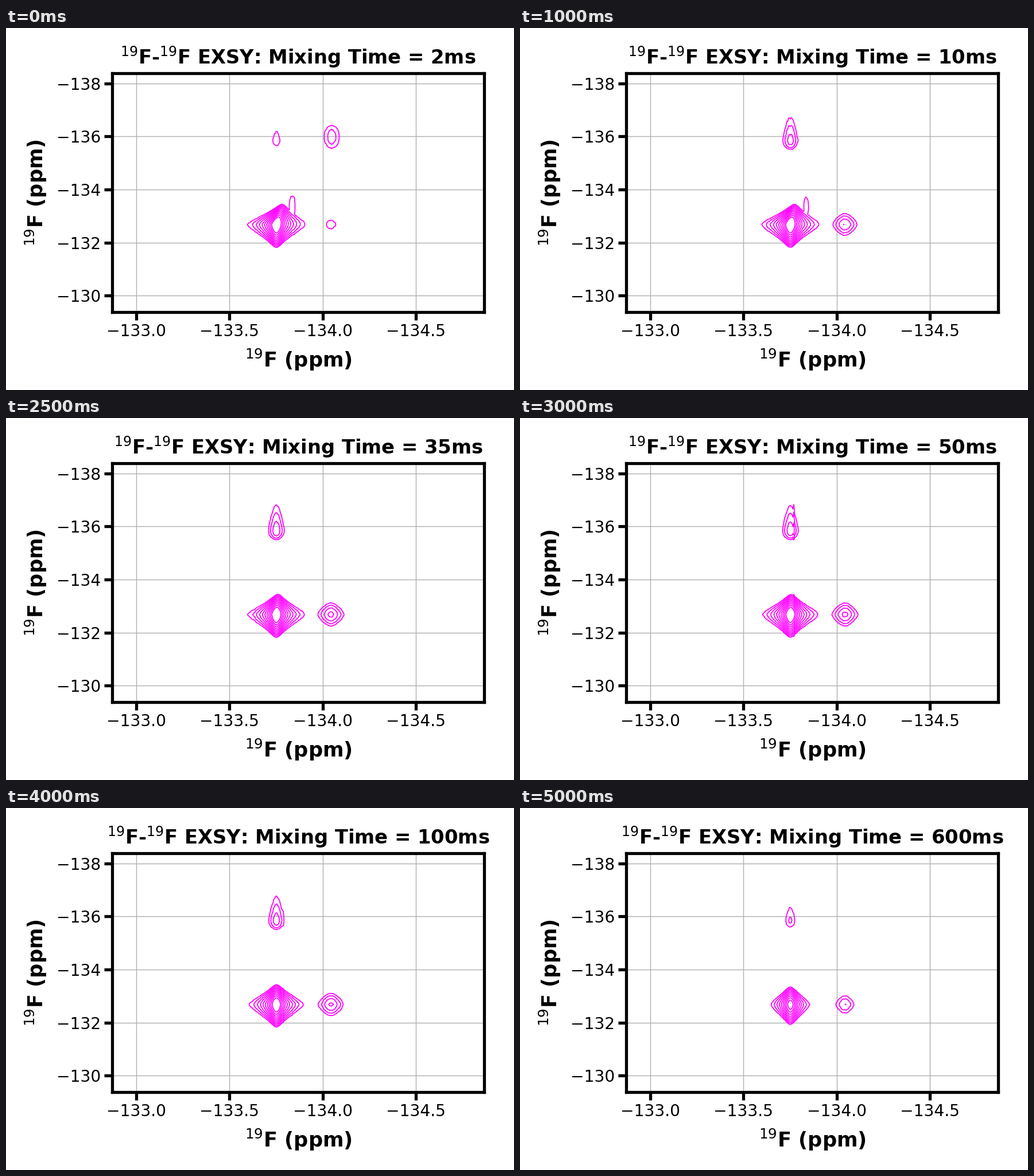
Animation, 885 px wide and 632 px high, one loop 5.5 s. Source, as a matplotlib script:

```python
import matplotlib.pyplot as plt
import numpy as np
from matplotlib.animation import FuncAnimation
from matplotlib.collections import LineCollection

W, H, DPI = 885, 632, 128
LEFT, RIGHT, TOP, BOTTOM = 185.1, 833.3, 79.1, 496.1
MAGENTA = "#ff00ff"
TIMES = [2, 5, 10, 15, 25, 35, 50, 75, 100, 200, 600]
LEVELS = np.arange(10)


def ppm_x(px):
    return -133 - (px - 226.9) / 324.8


def ppm_y(py):
    return -130 - (467.3 - py) / 46.325


# Stage pixels on which the spectrum is sampled
X, Y = np.meshgrid(np.arange(405, 610, 1.5), np.arange(140, 400, 1.0))


def peak(cx, cy, height, width, up, down):
    """Log intensity, in contour steps: Lorentzian across, stretched decay along.

    up and down are (scale, power) of the decay on each side.
    """
    dy = cy - Y
    along = np.where(dy > 0, (np.abs(dy) / up[0]) ** up[1],
                     (np.abs(dy) / down[0]) ** down[1])
    return height - 3 * np.log1p(((X - cx) / width) ** 2) - along


def build_up(t, top, gain, fade):
    """Exchange peak: grows with mixing, then relaxes."""
    return top + gain * np.log(1 - np.exp(-t / 5)) - fade * t


def spectrum(t, rng):
    lean = 11 * np.exp(-t / 25) * np.clip((343 - Y) / 35, 0, 1.2)
    shoulder = 1 - 0.03 * t - ((X - 498.5) / 5) ** 2 - ((Y - 312) / 20) ** 2
    z = np.max([
        peak(471 + lean, 343, 11.3 - 0.0039 * t, 7.7, (7.75, 1.6), (8.84, 1.6)),
        peak(471, 195, build_up(t, 2.85, 1.9, 0.0028), 11.4, (18.5, 1.2), (11.9, 2.6)),
        peak(566, 343, build_up(t, 3.38, 2.4, 0.0023), 16, (9.5, 1.6), (9.5, 1.6)),
        peak(567.5, 190, 2.17 - t / 3, 16, (17, 2.5), (17, 2.5)),
        shoulder,
    ], axis=0)
    # Noise runs along columns and drowns in strong signal
    columns = 0.05 * rng.standard_t(3, X.shape[1])
    grain = rng.normal(0, 0.025, X.shape)
    return z + (columns + grain) * np.exp(-np.clip(z, 0, None) / 4)


plt.rcParams["font.family"] = "DejaVu Sans"
fig = plt.figure(figsize=(W / DPI, H / DPI), dpi=DPI, facecolor="white")
ax = fig.add_axes([LEFT / W, 1 - BOTTOM / H, (RIGHT - LEFT) / W, (BOTTOM - TOP) / H])
ax.set_xlim(ppm_x(LEFT), ppm_x(RIGHT))
ax.set_ylim(ppm_y(BOTTOM), ppm_y(TOP))
ax.set_xticks(np.arange(-133, -135, -0.5))
ax.set_yticks(np.arange(-138, -129, 2))
ax.tick_params(length=7.9, width=2.96, pad=3.5, labelsize=15.8)
ax.grid(color="#b0b0b0", linewidth=0.8)
for spine in ax.spines.values():
    spine.set_linewidth(2.96)

lines = LineCollection([], colors=MAGENTA, linewidths=1)
ax.add_collection(lines, autolim=False)


def label(x, y, text, size, **kw):
    return fig.text(x / W, 1 - y / H, text, fontsize=size, fontweight="bold",
                    ha="center", va="baseline", **kw)


F19 = "$^{19}$F"
CX, CY = (LEFT + RIGHT) / 2, (TOP + BOTTOM) / 2
title = label(CX, 62, "", 18.96)
label(CX, 592, F19 + " (ppm)", 19.75)
label(64.6, CY, F19 + " (ppm)", 19.75, rotation=90, rotation_mode="anchor")


def draw(i):
    t = TIMES[i]
    title.set_text(f"{F19}-{F19} EXSY: Mixing Time = {t}ms")
    z = spectrum(t, np.random.default_rng(t))
    contours = ax.contour(ppm_x(X), ppm_y(Y), z, levels=LEVELS)
    lines.set_segments([seg for level in contours.allsegs for seg in level])
    contours.remove()
    return lines, title


anim = FuncAnimation(fig, draw, frames=len(TIMES), interval=500,
                     init_func=lambda: draw(0), repeat=True, repeat_delay=0)
plt.show()
```
